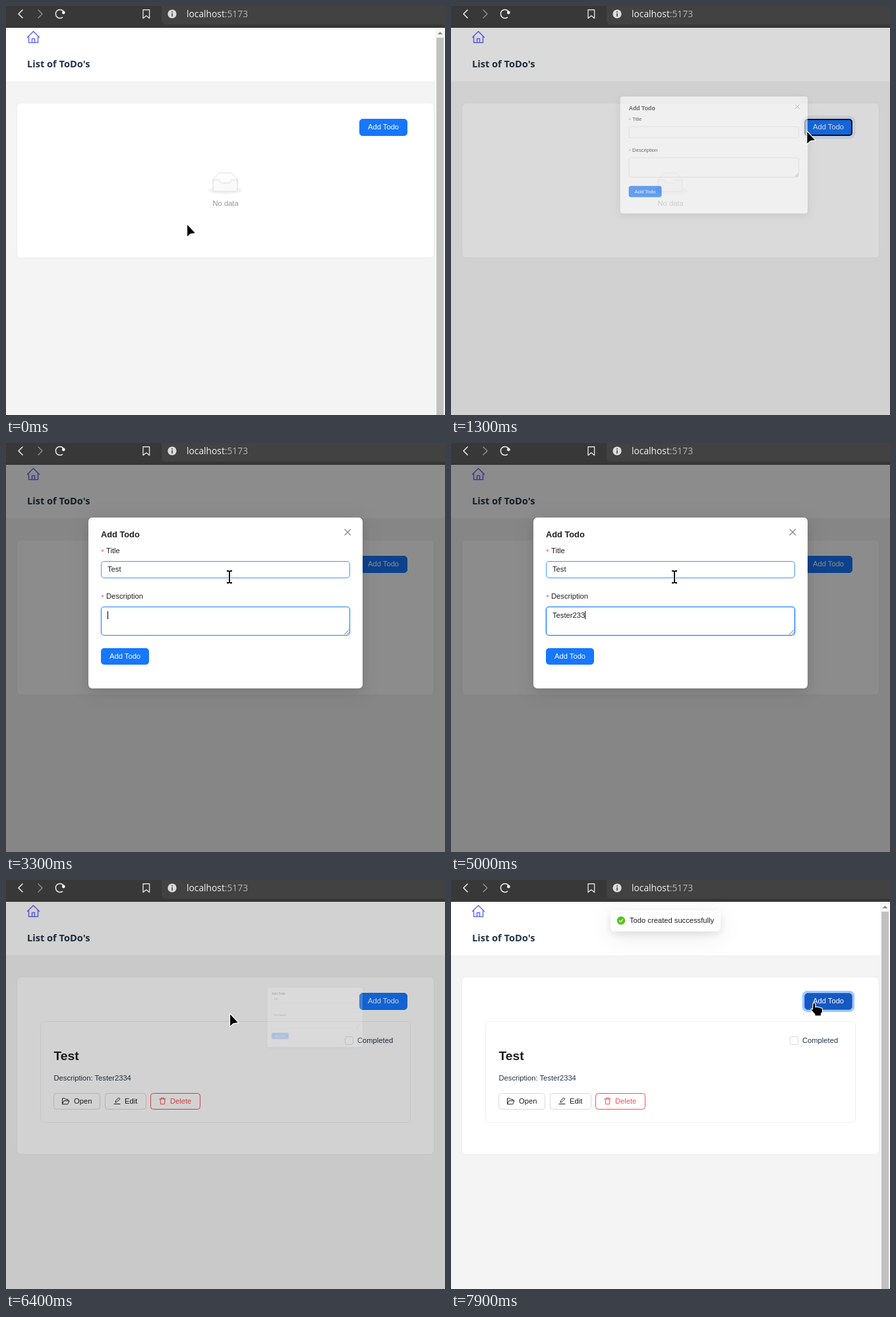
Write an HTML page that moves like this. It is 666 px wide and 620 px high and loops after 8000 ms.

```html
<!DOCTYPE html>
<html lang="en">
<head>
<meta charset="utf-8">
<title>Todo list</title>
<style>
  html, body { margin: 0; width: 100%; height: 100%; overflow: hidden; background: #f4f4f4; }
  svg { display: block; width: 666px; height: 620px; }
  text { font: 11.2px "Liberation Sans", Arial, sans-serif; fill: #1f1f1f; white-space: pre; }
  .ui { font-family: "Open Sans", "Noto Sans", sans-serif; }
  .line { fill: none; stroke-linecap: round; stroke-linejoin: round; }
  .white { fill: #fff; }
  .star { fill: #ff4d4f; }
  .ring { fill: none; stroke: #91caff; stroke-width: 2.8; }
  #modalBox { filter: drop-shadow(0 5px 8px rgba(0,0,0,.1)) drop-shadow(0 4px 16px rgba(0,0,0,.06)); }
  #toastBox { filter: drop-shadow(0 4px 6px rgba(0,0,0,.09)) drop-shadow(0 7px 16px rgba(0,0,0,.08)); }
</style>
</head>
<body>
<svg viewBox="0 0 666 620">
  <!-- page -->
  <rect width="666" height="620" fill="#f4f4f4"/>
  <rect y="33" width="666" height="81" fill="#fff"/>
  <path class="line" stroke="#646cff" stroke-width="1.5" d="M32.5 47.5 41.5 38.5 50.5 47.5M34.5 46V55.5H48.5V46M39.5 55.5V49.5H43.5V55.5"/>
  <text class="ui" x="32" y="93" style="font-size:14.6px;font-weight:700;fill:#213547">List of ToDo's</text>
  <rect id="panel" x="16.5" y="147" width="633" height="235" rx="6" fill="#fff" stroke="#ededed"/>

  <g id="empty">
    <g transform="translate(307 252.2) scale(.8)" stroke="#d9d9d9" stroke-width="1.1">
      <ellipse cx="32" cy="34" rx="32" ry="7" fill="#f2f2f2" stroke="none"/>
      <path fill="#fff" d="M55 14 44.8 2.2Q44 1 42.9 1H21.1Q20 1 19.2 2.2L9 14V23H55Z"/>
      <path fill="#fafafa" d="M41.6 17C41.6 15.3 42.6 14 43.8 14H55V32Q55 36 52 36H12Q9 36 9 32V14H20.2C21.4 14 22.4 15.3 22.4 17S23.4 19.9 24.6 19.9H39.4C40.6 19.9 41.6 18.6 41.6 17Z"/>
    </g>
    <text x="313.5" y="303" style="fill:#959595">No data</text>
  </g>

  <g id="item">
    <rect x="52.5" y="214.5" width="561" height="153" rx="6" fill="#fff" stroke="#f0f0f0"/>
    <rect x="514.5" y="237.5" width="12" height="12" rx="2.5" fill="#fff" stroke="#d9d9d9"/>
    <text x="533" y="247" style="fill:#213547">Completed</text>
    <text x="72.5" y="273" style="font-size:19.2px;font-weight:700">Test</text>
    <text x="72.5" y="304" style="fill:#213547">Description: Tester2334</text>
    <g fill="#fff" stroke="#d9d9d9">
      <rect x="72.5" y="323.5" width="70" height="24" rx="4"/>
      <rect x="150.5" y="323.5" width="62" height="24" rx="4"/>
      <rect x="219.5" y="323.5" width="75" height="24" rx="4" stroke="#ff4d4f"/>
    </g>
    <g class="line" stroke="#222">
      <path d="M85.5 339.5V331H89.2L90.6 332.5H94V334.5M85.5 339.5 87.8 334.7H96L93.8 339.5Z"/>
      <path d="M164 339.5H173M166 336.8 166.4 334.6 171 330 172.8 331.8 168.2 336.4Z"/>
      <path stroke="#ff4d4f" d="M233 332H242M235.5 332V330.3H239.5V332M234 332 234.5 339.7H240.5L241 332"/>
    </g>
    <text x="103" y="339">Open</text>
    <text x="180" y="339">Edit</text>
    <text x="249" y="339" style="fill:#ff4d4f">Delete</text>
  </g>

  <rect id="wave" fill="#1677ff"/>
  <rect id="addRing" class="ring" x="534.4" y="169.4" width="76.2" height="29.2" rx="6"/>
  <rect id="addBtn" x="536.5" y="171.5" width="72" height="25" rx="4.5"/>
  <rect id="addFocus" x="537" y="172" width="71" height="24" rx="4" fill="none" stroke="#101010" stroke-width="2"/>
  <text class="white" x="549" y="187">Add Todo</text>

  <g id="scroll">
    <rect x="651" y="33" width="15" height="587" fill="#f6f6f6"/>
    <rect x="653" y="48" width="11" height="572" fill="#c1c1c1"/>
    <path d="M654.5 43 658.5 39 662.5 43Z" fill="#8b8b8b"/>
  </g>

  <!-- dialog -->
  <rect id="mask" y="33" width="666" height="587"/>
  <g id="modal">
    <rect id="modalBox" x="125" y="113" width="416" height="259" rx="6" fill="#fff"/>
    <text x="144" y="143" style="font-size:12.8px;font-weight:700">Add Todo</text>
    <path class="line" stroke="#8a8a8a" stroke-width="1.3" d="M514 131 522.5 139.5M522.5 131 514 139.5"/>
    <text class="star" x="144.3" y="168.5">*</text>
    <text x="152" y="167">Title</text>
    <rect id="titleGlow" x="143.5" y="178.5" width="379" height="27" rx="5.5" fill="none" stroke="#0591ff" stroke-width="2"/>
    <rect id="titleBox" x="144.5" y="179.5" width="377" height="25" rx="4.5" fill="#fff"/>
    <text id="titleText" x="154" y="195"></text>
    <rect id="titleCaret" y="186" width="1" height="12"/>
    <text class="star" x="144.3" y="237.5">*</text>
    <text x="152" y="236">Description</text>
    <rect id="noteGlow" x="143.5" y="247.5" width="379" height="45" rx="5.5" fill="none" stroke="#0591ff" stroke-width="2"/>
    <rect id="noteBox" x="144.5" y="248.5" width="377" height="43" rx="4.5" fill="#fff"/>
    <path class="line" stroke="#666" d="M513.5 290 520 283.5M517.5 290 520 287.5"/>
    <text id="noteText" x="154" y="265"></text>
    <rect id="noteCaret" y="255" width="1" height="12"/>
    <rect id="sendRing" class="ring" x="142.4" y="309.4" width="76.2" height="28.2" rx="6"/>
    <rect x="144" y="311" width="73" height="25" rx="5" fill="#1677ff"/>
    <text class="white" x="157" y="327">Add Todo</text>
  </g>

  <!-- toast -->
  <g id="toast">
    <rect id="toastBox" x="242" y="46" width="167" height="32" rx="6" fill="#fff"/>
    <circle cx="258" cy="61.5" r="6.2" fill="#52c41a"/>
    <path class="line" stroke="#fff" stroke-width="1.3" d="M255.6 61.7 257.4 63.6 260.6 59.6"/>
    <text x="271" y="65">Todo created successfully</text>
  </g>

  <!-- browser bar -->
  <rect width="666" height="33" fill="#383838"/>
  <rect y="32" width="666" height="1" fill="#2a2a2a"/>
  <rect x="236" y="-10" width="440" height="38" rx="6" fill="#424242"/>
  <g class="line" stroke="#f0f0f0" stroke-width="1.5">
    <path d="M25 6 19 12 25 18"/>
    <path stroke="#8c8c8c" d="M49 6 55 12 49 18"/>
    <path d="M85.5 17.3A6.5 6.5 0 1 1 88 10"/>
    <path stroke="#ddd" stroke-width="1.4" d="M208 5.8H217.6V18.6L212.8 14.8 208 18.6Z"/>
  </g>
  <circle cx="87.3" cy="10" r="2.4" fill="#f0f0f0"/>
  <circle cx="252" cy="12" r="6.6" fill="#dcdcdc"/>
  <path stroke="#424242" stroke-width="1.6" d="M252 11V16M252 8V9.7"/>
  <text class="ui" x="274" y="17" style="font-size:13.8px;fill:#f2f2f2">localhost<tspan fill="#b4b4b4">:5173</tspan></text>

  <!-- pointers -->
  <g id="pointer" stroke="#fff" stroke-linejoin="round">
    <path id="arrow" stroke-width="1.2" d="M-.5-.8V19.8L5 14.6 13 13.6Z"/>
    <path id="hand" stroke-width="1.2" d="M-2 2Q0-2 2 2V7Q4 5.5 6 7 8 6 9.5 8 12.5 7.5 12.5 10V14L10.5 17V20H1V18L-5 11Q-5.5 8-2.5 10Z"/>
    <g id="beam" fill="none">
      <path stroke-width="4" d="M-4-9H4M-4 9H4M0-9V9"/>
      <path stroke="#000" stroke-width="1.9" d="M-4-9H-1.5L0-8 1.5-9H4M-4 9H-1.5L0 8 1.5 9H4M0-8V8"/>
    </g>
  </g>
</svg>
<script>
const LOOP = 8000;
const OPEN = 1270, CLOSE = 6280, CLOSED = 6480, SAVED = 6200;
const TITLE_FOCUS = 1900, NOTE_FOCUS = 3200, SEND_FOCUS = 6100;
const ORIGIN = [541, 190];

const path = [
  [200, 275, 331], [500, 360, 286], [800, 500, 212], [1000, 541, 190],
  [1300, 541, 190], [1500, 400, 194], [1750, 347, 202], [2000, 339, 203],
  [6280, 339, 203], [6281, 340, 203], [7000, 340, 203], [7200, 309, 201],
  [7500, 425, 167], [7700, 532, 172], [7850, 551, 186]
];
const titleKeys = { text: "Test", at: [2700, 2800, 2900, 3100] };
const noteKeys = { text: "Tester2334", at: [3500, 3700, 3800, 3900, 4000, 4100, 4700, 4800, 5000, 5200] };

const el = {};
document.querySelectorAll("[id]").forEach(n => el[n.id] = n);

const clamp = v => Math.max(0, Math.min(1, v));
const span = (t, start, length) => clamp((t - start) / length);
const mix = (a, b, k) => a + (b - a) * k;
const show = (name, on) => el[name].setAttribute("opacity", +on);
const set = (name, attrs) => { for (const k in attrs) el[name].setAttribute(k, attrs[k]); };
const blend = (a, b, k) => `rgb(${a.map((v, i) => Math.round(mix(v, b[i], k)))})`;

function bezier(x1, y1, x2, y2) {
  const curve = (a, b, s) => 3 * a * s * (1 - s) ** 2 + 3 * b * s * s * (1 - s) + s ** 3;
  return x => {
    let lo = 0, hi = 1;
    for (let i = 0; i < 24; i++) {
      const mid = (lo + hi) / 2;
      if (curve(x1, x2, mid) < x) lo = mid; else hi = mid;
    }
    return curve(y1, y2, (lo + hi) / 2);
  };
}
const circOut = bezier(.08, .82, .17, 1);
const circInOut = bezier(.78, .14, .15, .86);

const BLUE = [22, 119, 255], HOVER = [64, 150, 255], ACTIVE = [9, 88, 217];
const GREY = [217, 217, 217], PRESSED = [20, 89, 194];

function pointerAt(t) {
  if (t <= path[0][0]) return path[0].slice(1);
  for (let i = 1; i < path.length; i++) {
    const [t0, x0, y0] = path[i - 1], [t1, x1, y1] = path[i];
    if (t < t1) {
      const k = span(t, t0, t1 - t0);
      return [mix(x0, x1, k), mix(y0, y1, k)];
    }
  }
  return path[path.length - 1].slice(1);
}

function drawField(name, t, keys, focus, blur, hover) {
  const count = t < SAVED ? keys.at.filter(a => a <= t).length : 0;
  const text = el[name + "Text"], typed = keys.text.slice(0, count);
  if (text.textContent !== typed) text.textContent = typed;
  const since = t - Math.max(focus, count ? keys.at[count - 1] : 0);
  const focused = t >= focus && t < blur;
  show(name + "Caret", focused && since % 1200 < 600);
  set(name + "Caret", { x: 154 + (count ? text.getComputedTextLength() : 0) });
  const glow = span(t, focus, 200) * (1 - span(t, blur, 100));
  show(name + "Glow", glow * .14);
  const border = blend(GREY, HOVER, hover);
  set(name + "Box", { stroke: glow > .05 ? blend(HOVER, BLUE, glow) : border, "stroke-width": 1 + glow * .2 });
}

function drawButton(t) {
  let fill = blend(BLUE, HOVER, span(t, 900, 150));
  if (t >= 1120) fill = blend(ACTIVE, BLUE, span(t, 1180, 120));
  if (t >= 2000) fill = blend(BLUE, HOVER, span(t, 7600, 120));
  if (t >= 7790) fill = blend(HOVER, PRESSED, span(t, 7790, 100));
  const over = (t >= 930 && t < OPEN) || t >= 7620;
  set("addBtn", { fill, stroke: over ? "#4468f5" : fill });
  show("addFocus", t >= 1180 && t < 1600);
  show("addRing", t >= CLOSED);
  const k = span(t, 1180, 300), grow = 5 * circOut(k);
  set("wave", {
    x: 536 - grow, y: 171 - grow, width: 73 + 2 * grow, height: 26 + 2 * grow, rx: 5 + grow,
    opacity: t > 1180 ? .2 * (1 - k) : 0
  });
}

function drawModal(t) {
  const zoom = t < CLOSE ? circOut(span(t, OPEN, 300)) : 1 - circInOut(span(t, CLOSE, 200));
  const [ox, oy] = ORIGIN;
  set("modal", {
    opacity: t < OPEN ? 0 : zoom,
    transform: `translate(${ox} ${oy}) scale(${mix(.2, 1, zoom)}) translate(${-ox} ${-oy})`
  });
  show("mask", .45 * span(t, 1236, 200) * (1 - span(t, CLOSE, 200)));
  const hover = span(t, 1400, 160) * (1 - span(t, CLOSE - 40, 40));
  drawField("title", t, titleKeys, TITLE_FOCUS, NOTE_FOCUS, hover);
  drawField("note", t, noteKeys, NOTE_FOCUS, SEND_FOCUS, 0);
  show("sendRing", t >= SEND_FOCUS);
}

function drawPointer(t) {
  const [x, y] = pointerAt(t);
  const inside = (x0, y0, x1, y1) => x >= x0 && x <= x1 && y >= y0 && y <= y1;
  const modal = t >= OPEN && t < CLOSE;
  const hand = !modal && inside(536, 171, 609, 197);
  const beam = modal && inside(144, 179, 522, 205);
  set("pointer", { transform: `translate(${x} ${y})` });
  show("hand", hand);
  show("beam", beam);
  show("arrow", !hand && !beam);
}

function draw(t) {
  const saved = t >= SAVED;
  show("empty", !saved);
  show("item", saved);
  set("panel", { height: saved ? 269 : 235 });
  show("scroll", t < 1236 || t >= CLOSED);
  drawButton(t);
  drawModal(t);
  const k = 1 - (1 - span(t, 6400, 200)) ** 2.5;
  set("toast", { opacity: k, transform: `translate(0 ${-38 * (1 - k)})` });
  drawPointer(t);
}

const start = performance.now();
function tick() {
  draw((performance.now() - start) % LOOP);
  requestAnimationFrame(tick);
}
tick();
</script>
</body>
</html>
```
